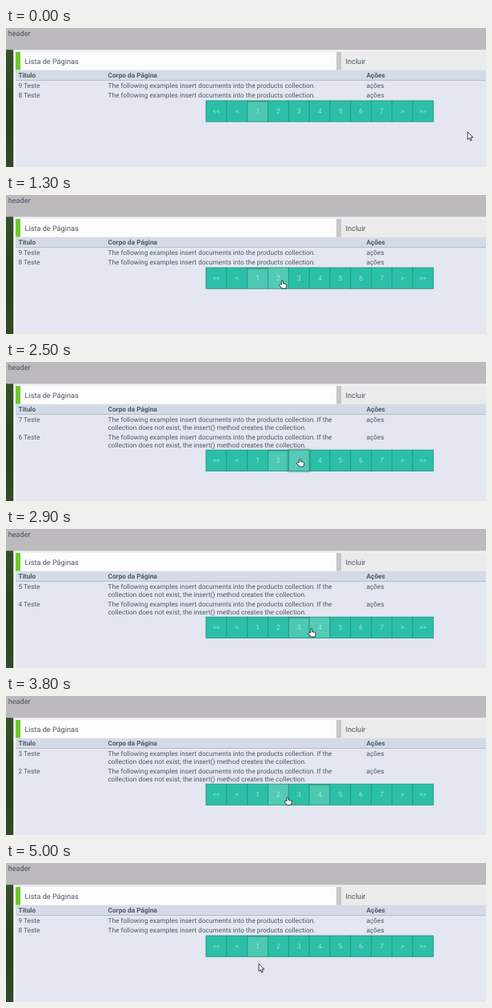
Write an HTML page that moves like this. It is 600x174 px and loops after 5.1 s.

```html
<!DOCTYPE html>
<html lang="pt">
<head>
<meta charset="utf-8">
<title>Lista de Páginas</title>
<style>
  html, body { margin: 0; width: 100%; height: 100%; overflow: hidden; background: #e4e7f0; }
  svg { display: block; width: 100vw; height: 100vh; }
  text { font-family: Roboto, sans-serif; font-size: 8.3px; fill: #4d5a64; white-space: pre; text-rendering: geometricPrecision; }
  .large { font-size: 9.15px; fill: #4a555e; }
  .head { font-weight: 700; }
  .page { font-weight: 300; font-size: 8.6px; fill: #d9f5ef; text-anchor: middle; }
  .pointer { fill: #fff; stroke: #20242a; stroke-width: 0.9; stroke-linejoin: round; }
  .beam { fill: none; stroke: #30363c; stroke-width: 1; }
</style>
</head>
<body>
<svg viewBox="0 0 600 174">
  <defs>
    <linearGradient id="leaf" x2="0" y2="1">
      <stop stop-color="#35502a"/>
      <stop offset=".5" stop-color="#2a4320"/>
      <stop offset="1" stop-color="#34482a"/>
    </linearGradient>
    <linearGradient id="inset" x2="0" y2="1">
      <stop stop-color="#1b7d6e" stop-opacity=".7"/>
      <stop offset="1" stop-color="#1b7d6e" stop-opacity="0"/>
    </linearGradient>
    <filter id="glow" x="-30%" y="-30%" width="160%" height="160%">
      <feGaussianBlur stdDeviation="1"/>
    </filter>
  </defs>
  <rect width="600" height="174" fill="#e4e7f0"/>
  <rect y="27" width="9.5" height="147" fill="url(#leaf)"/>
  <rect x="9.5" y="27" width="2.5" height="147" fill="#f4f4f7"/>
  <rect x="9.5" y="27" width="590.5" height="3" fill="#f0eff1"/>
  <rect width="600" height="27.3" fill="#bcbabc"/>
  <text class="large" x="2.7" y="10.3">header</text>
  <rect x="12" y="30" width="401" height="22.5" fill="#fdfcfd"/>
  <rect x="12" y="30" width="6" height="22.5" fill="#6cca2c"/>
  <rect x="413" y="30" width="187" height="22.5" fill="#ebebec"/>
  <rect x="413" y="30" width="6" height="22.5" fill="#c8c6c8"/>
  <text class="large" x="23.6" y="44.8">Lista de Páginas</text>
  <text class="large" x="424.6" y="44.8">Incluir</text>
  <rect x="12" y="53" width="588" height="13" fill="#d4dbe6"/>
  <rect x="12" y="65" width="588" height="1" fill="#b4bfcc"/>
  <g id="table"></g>
  <g id="pager"></g>
  <g id="cursor"></g>
</svg>
<script>
const LOOP = 5100, STEP = 100;
const BAR_X = 250, CELL = 25.83, BAR_H = 26.2;
const COLUMNS = [15.5, 127.5, 450.5];
const LABELS = ['<<', '<', 1, 2, 3, 4, 5, 6, 7, '>', '>>'];
const SHORT = ['The following examples insert documents into the products collection.'];
const LONG = [SHORT[0] + ' If the', 'collection does not exist, the insert() method creates the collection.'];

// [start time, page]
const PAGES = [[0, 1], [1500, 2], [2600, 3], [3500, 4], [4400, 1]];
// [start, end, button held down]
const PRESSES = [[1400, 1500, 2], [2500, 2600, 3], [3200, 3500, 4], [4300, 4400, 1]];
// [time, x, y, shape from this time on]
const PATH = [
  [0, 577, 130, 'arrow'], [600, 570, 131, 'arrow'], [800, 515, 127, 'arrow'],
  [900, 462, 114, 'hand'], [1200, 345.5, 107, 'hand'], [1600, 345, 107, 'beam'],
  [1900, 345, 106, 'beam'], [2100, 356, 115, 'hand'], [2400, 367.3, 121, 'hand'],
  [2700, 367.3, 121, 'hand'], [3000, 389, 127, 'hand'], [3300, 389, 127, 'arrow'],
  [3600, 389, 127, 'hand'], [4000, 315, 126, 'hand'], [4100, 315, 126, 'arrow'],
  [4800, 315, 126, 'arrow'], [5000, 316, 126, 'arrow']
];
const SHAPES = {
  arrow: '<path class="pointer" d="M0 0V9.5L2.2 7.6 3.7 11 5.2 10.3 3.8 7H6.8Z"/>',
  hand: '<path class="pointer" d="M-1 5V1A1 1 0 0 1 1 1V3.6L4.2 4.3A1.2 1.2 0 0 1 5.2 5.5V7.5L4.4 10H-.4L-3.6 6.3A.9.9 0 0 1-2.3 5Z"/>',
  beam: '<path class="beam" d="M-2-4H2M-2 4H2M0-4V4"/>'
};

const $ = id => document.getElementById(id);
const escape = label => String(label).replace(/</g, '&lt;');
const text = (x, y, label, cls = '') => `<text x="${x}" y="${y}" class="${cls}">${escape(label)}</text>`;
const latest = (list, time) => list.filter(item => item[0] <= time).pop();

function cursorAt(time) {
  const from = latest(PATH, time);
  const to = PATH[PATH.indexOf(from) + 1] || from;
  const k = to === from ? 0 : (time - from[0]) / (to[0] - from[0]);
  return { x: from[1] + (to[1] - from[1]) * k, y: from[2] + (to[2] - from[2]) * k, shape: from[3] };
}

function tableMarkup(page) {
  const lines = page === 1 ? SHORT : LONG;
  const rowHeight = page === 1 ? 12.3 : 22;
  const heads = ['Titulo', 'Corpo da Página', 'Ações'];
  let out = heads.map((label, i) => text(COLUMNS[i], 62.3, label, 'head')).join('');
  for (let row = 0; row < 2; row++) {
    const y = 75 + row * rowHeight;
    out += text(COLUMNS[0], y, `${11 - 2 * page - row} Teste`);
    out += lines.map((line, i) => text(COLUMNS[1], y + i * 9.9, line)).join('');
    out += text(COLUMNS[2], y, 'ações');
  }
  return out;
}

function pagerMarkup(page, top, hovered, pressed) {
  const cell = (i, attrs) =>
    `<rect x="${BAR_X + i * CELL}" y="${top}" width="${CELL}" height="${BAR_H}" ${attrs}/>`;
  let out = '', front = '';
  LABELS.forEach((label, i) => {
    const active = label === page, held = label === pressed;
    const fill = active ? '#4cc8b3' : i === hovered || held ? '#53cbb7' : '#2cbfa7';
    let part = cell(i, `fill="${fill}" stroke="#239885" stroke-width=".9"`);
    if (active) {
      part += `<rect x="${BAR_X + i * CELL}" y="${top}" width="${CELL}" height="2.5" fill="url(#inset)"/>`;
    }
    if (held) {
      part = cell(i, 'fill="none" stroke="#3f6f6a" stroke-opacity=".7" stroke-width="2" filter="url(#glow)"') + part;
    }
    part += text(BAR_X + (i + 0.5) * CELL, top + 16.2, label, 'page');
    if (held) front += part; else out += part;
  });
  return out + front;
}

function draw(time) {
  const page = latest(PAGES, time)[1];
  const press = PRESSES.find(([start, end]) => time >= start && time < end);
  const top = page === 1 ? 91 : 110.2;
  const { x, y, shape } = cursorAt(time);
  const inside = y >= top && y <= top + BAR_H;
  const hovered = inside ? Math.floor((x - BAR_X) / CELL) : -1;
  $('table').innerHTML = tableMarkup(page);
  $('pager').innerHTML = pagerMarkup(page, top, hovered, press && press[2]);
  $('cursor').innerHTML = `<g transform="translate(${x} ${y})">${SHAPES[shape]}</g>`;
}

let shown = -1;
function tick() {
  const time = Math.floor(performance.now() % LOOP / STEP) * STEP;
  if (time !== shown) draw(shown = time);
  requestAnimationFrame(tick);
}
tick();
</script>
</body>
</html>
```
